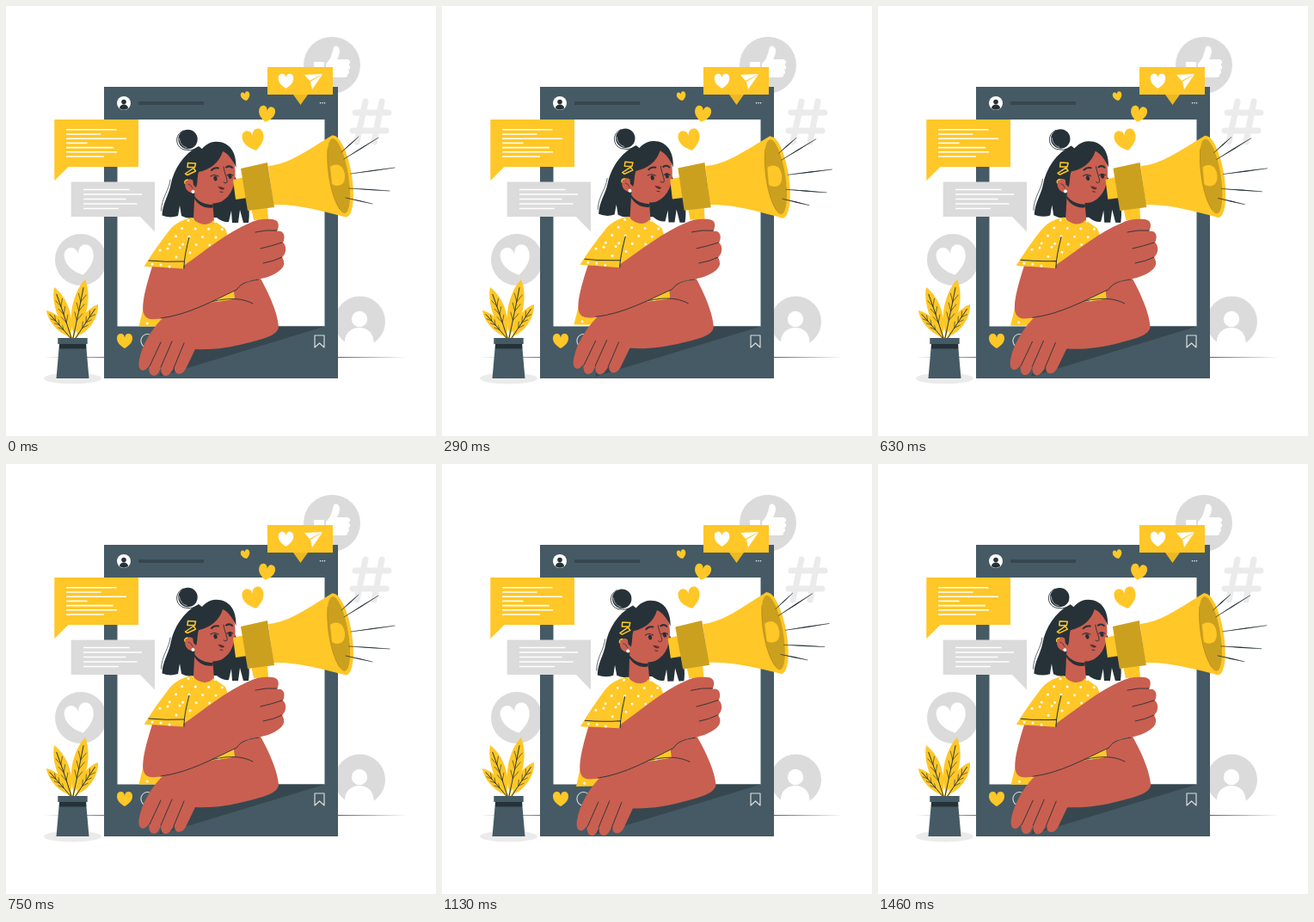
Write an HTML page with a canvas that moves like this. It is 500x500 px and loops after 1500 ms.

```html
<!DOCTYPE html>
<html lang="en">
<head>
<meta charset="utf-8">
<title>Announcement</title>
<style>
html, body { margin: 0; width: 100%; height: 100%; overflow: hidden; background: #fff; }
canvas { display: block; width: 500px; height: 500px; }
</style>
</head>
<body>
<canvas id="stage"></canvas>
<script>
const canvas = document.getElementById('stage');
const ctx = canvas.getContext('2d');
const ratio = window.devicePixelRatio || 1;
canvas.width = canvas.height = 500 * ratio;

const LOOP = 1500, TILT = Math.PI / 180, PIVOT = { x: 303, y: 288 };
const YELLOW = '#ffc727', GOLD = '#cca01f', GREY = '#dbdbdb', PALE = '#ebebeb', SLATE = '#455a64',
      DEEP = '#37474f', INK = '#263238', SKIN = '#c95f50', WHITE = '#fff';

function fill(d, color) {
  ctx.fillStyle = color;
  ctx.fill(new Path2D(d));
}
function line(d, color = INK, width = 1, cap = 'round') {
  ctx.strokeStyle = color;
  ctx.lineWidth = width;
  ctx.lineCap = cap;
  ctx.lineJoin = 'round';
  ctx.stroke(new Path2D(d));
}
function rect(x, y, right, bottom, color) {
  ctx.fillStyle = color;
  ctx.fillRect(x, y, right - x, bottom - y);
}
function oval(x, y, rx, ry, color, angle = 0) {
  ctx.fillStyle = color;
  ctx.beginPath();
  ctx.ellipse(x, y, rx, ry, angle, 0, 7);
  ctx.fill();
}
const disc = (x, y, r, color) => oval(x, y, r, r, color);

function heart(x, y, w, h, degrees, color) {
  ctx.save();
  ctx.translate(x, y);
  ctx.rotate(degrees * Math.PI / 180);
  ctx.scale(w, h);
  fill('M0 .5C-.22 .37-.5 .14-.5-.18C-.5-.41-.38-.5-.25-.5C-.1-.5-.02-.38 0-.22C.02-.38 .1-.5 .25-.5C.38-.5 .5-.41 .5-.18C.5 .14 .22 .37 0 .5Z', color);
  ctx.restore();
}
// Evenly spaced lines of dummy writing, all starting at one margin
function writing(x, y, step, ends) {
  ends.forEach((end, i) => line(`M${x} ${y + i * step}H${end}`, WHITE, 1.6, 'butt'));
}
function ray(x1, y1, x2, y2) {
  const len = Math.hypot(x2 - x1, y2 - y1);
  const nx = (y1 - y2) / len * .6, ny = (x2 - x1) / len * .6;
  const mx = (x1 + x2) / 2, my = (y1 + y2) / 2;
  fill(`M${x1} ${y1}L${mx + nx} ${my + ny}L${x2} ${y2}L${mx - nx} ${my - ny}Z`, INK);
  line(`M${x1} ${y1}L${x2} ${y2}`, INK, .65);
}
// A leaf from its foot to its tip, bulging by `left` and `right` of the midrib
function leaf(x, y, tipX, tipY, left, right) {
  const len = Math.hypot(tipX - x, tipY - y);
  ctx.save();
  ctx.translate(x, y);
  ctx.rotate(Math.atan2(tipY - y, tipX - x));
  line(`M0 0H${len * .2}`, YELLOW, 2);
  fill(`M${len * .06} 0C${len * .3} ${-left} ${len * .75} ${-left} ${len} 0C${len * .75} ${right} ${len * .3} ${right} ${len * .06} 0Z`, YELLOW);
  line(`M0 0Q${len * .5} ${(right - left) / 3} ${len * .86} 0`, INK, .9);
  for (let s = .3; s < .75; s += .16) {
    const mid = (right - left) / 3 * 2 * s * (1 - s);
    line(`M${s * len} ${mid}L${(s + .13) * len} ${mid - left * .4}M${s * len} ${mid}L${(s + .13) * len} ${mid + right * .4}`, INK, .6);
  }
  ctx.restore();
}

function drawBadges() {
  fill('M44 408.5L150 408L360 408L466 408.5L360 409L150 409Z', INK);

  disc(379, 68.7, 33, GREY);
  rect(358, 65, 370, 83, WHITE);
  fill('M372 67C378 62 379 55 381 48C383 45 388 47 388 52C388 56 386 60 385 62H397C401 63 401 67 398 68C401 70 401 73 398 74C400 77 399 79 397 79C398 82 396 83 393 83H379C375 83 374 81 372 81Z', WHITE);

  line('M418 111L408 158M437 111L428 158M406 124H445M403 145H442', PALE, 7);

  disc(87, 295, 30, GREY);
  heart(86, 296, 34, 34, -12, WHITE);

  disc(411.5, 367, 29.5, GREY);
  disc(411, 364, 9.2, WHITE);
  fill('M394 397V390C394 380 402 374 411 374C420 374 427 380 427.5 390V397Z', WHITE);
}

function drawPhone() {
  rect(114, 94, 386, 433, SLATE);
  rect(129.5, 132, 370.5, 372.5, WHITE);
  disc(137, 113, 8, WHITE);
  disc(137, 111.5, 2.8, INK);
  fill('M132 119C132 113 142 113 142 119Q137 122.5 132 119Z', INK);
  rect(154, 111, 230, 115, DEEP);
  for (const x of [365.5, 368, 370.5]) disc(x, 112.7, .75, WHITE);

  heart(138, 389.5, 18, 17, 0, YELLOW);
  line('M165 381.5A7.8 7.8 0 1 0 171 394L173 397L172 391A7.8 7.8 0 0 0 165 381.5', GREY, 1.1);
  line('M359 383H370V397L364.5 392L359 397Z', GREY, 1.2);
  fill('M371 372.5L178 431L190 396L280 372.5Z', DEEP);
}

function drawBubbles() {
  fill('M334 103H351L342.5 115Z', '#edb922');
  rect(304, 71, 380, 103, YELLOW);
  heart(325.5, 87.3, 17.5, 17, 0, WHITE);
  fill('M347 80L368 79L353 87ZM368 79.5L356 97L354 88Z', WHITE);

  fill('M56.3 132H154V187H72.5L56.3 203Z', YELLOW);
  writing(70, 143.8, 5.2, [128.5, 110.5, 140, 94.5, 125, 129, 114]);
  fill('M75.7 204.5H173V262.5L156 245H75.7Z', GREY);
  writing(90, 213.5, 5.5, [143.5, 158, 139.5, 152.5, 131]);

  heart(288, 156, 25, 24.5, -13, YELLOW);
  heart(303, 125.7, 19, 18.5, 10, YELLOW);
  heart(278.5, 105, 10.5, 10.5, -14, YELLOW);
}

function drawPlant() {
  oval(77.5, 433, 33.5, 6.5, PALE);
  leaf(75, 386, 47, 354, 7, 8);
  leaf(76, 386, 56, 327, 9, 11);
  leaf(78, 386, 92, 318, 11, 12);
  leaf(81, 386, 107, 347, 9, 9);
  fill('M62 393H93L96.5 433H58.5Z', SLATE);
  rect(62, 392, 93.2, 398.5, INK);
  rect(60.3, 386, 94.7, 393, SLATE);
}

function drawHairAndNeck() {
  fill('M224 163C206 172 195 190 191.5 208C189 221 182 229 181.5 243.5Q191 247 200 244L202 232L204 244Q211 248 220 246H245Q252 252 259 251L262 238L263 252H270L272 237L276 252H282C284 240 282 230 279 220L264 195Z', INK);
  line('M191 202C190 214 181 222 180.5 238', INK, .7);
  disc(211.5, 155, 11.2, INK);
  line('M206 145C195 150 197 164 207 167Q214 169 222 166', INK, .9);
  line('M201.5 154C202 160 206 164 210 164.5', WHITE, .6);
  fill('M220 205L218 247C222 261 238 262 242 250L240 226Z', SKIN);
}

function drawFace() {
  fill('M222 192C230 176 243 169 252 168C260 170 264 178 266 186C268 201 265 217 254 225C247 231 235 231 228 224L220 217C211 219 206 210 209 204C212 199 218 201 221 207Z', SKIN);
  fill('M218 208C214 179 228 158 244 157.7C260 157.5 268 170 267.5 188C264 180 259 172 252 169C248 182 238 190 224 193C222 200 223 207 221 211Z', INK);
  fill('M219 221C225 229 233 231 240.5 231V234.5C231 236 223 231 219 224Z', INK);
  line('M239 191Q242 187.5 247 188.5M256 187.5Q260 185 263 188', INK, 2);
  oval(243.5, 200.5, 2.1, 2.9, INK, -.2);
  oval(260.5, 198, 2.1, 2.9, INK, -.2);
  line('M238 198Q242 195 247 198M257 197Q260 194 264 197', INK, 1.1);
  line('M253 187C254 195 258 202 257 205Q255 207 253 205', INK, .9);
  fill('M247 211Q250 208.5 252 211Q254 210.5 254 212.5Q251 215.5 247 211Z', '#8e302d');
  line('M247 210Q249 213 253 212.5M249 216L252 216.5', INK, .9);
  line('M212 207Q215 207 217 212', INK, .7);
  disc(217.5, 216, 2, WHITE);
  line('M211.5 182.5L220.5 183L219.5 187.5L211 187.5ZM208.5 195L218 188.5L220.5 192L211 196.5Z', YELLOW, 1.5);
  line('M208 206Q207 203 211 202', YELLOW, 1.5);
}

function drawShirt() {
  const shape = 'M216 246C203 249 195 254 189 262C179 275 169 289 161 302.5L171 304L154.5 372.5H180L266 344L270 300L255 259L241 249C236 256 225 256 216 246Z';
  fill(shape, YELLOW);
  ctx.save();
  ctx.clip(new Path2D(shape));
  for (let row = 0; row < 15; row++)
    for (let col = 0; col < 9; col++)
      disc(150 + col * 15.5 + row % 2 * 7.7 + row * .5, 248 + row * 9.3 + col * .4, 1.5, WHITE);
  ctx.restore();
}

function drawRestingArm() {
  fill('M264 325L296 317C304 331 316 356 317 373C316 383 300 387 282 391.5C260 397.5 240 400 220 399L209 422C204 431 195 429 196 420L191 427C185 434 178 428 181 419L177 427C171 434 164 427 167 418L162 423C156 426 153 420 155 411C158 395 168 378 180 365C194 353 210 349 229 346C248 343 259 343 266 340Z', SKIN);
  line('M180 391L167 419M193 390L180 420M207 392L195 421', INK, .9);
  line('M229 346C247 342 268 336 287 346', INK, .9);
}

function drawMegaphone() {
  fill('M285 234H304L305 248L288 249Z', YELLOW);
  fill('M264 202L277 199L281 223L267 225Z', YELLOW);
  fill('M305 186C329 184 350 168 380 150L396 245.5C369 239 340 230 311 231Z', YELLOW);
  fill('M273 189L304 182L312 234L281 238Z', GOLD);
  oval(388, 198, 14, 48, YELLOW, -.165);
  oval(386.8, 197.5, 11.3, 44, GOLD, -.165);
  fill('M377 187C382 183 388 184 391 188C395 194 395 203 391 207Q385 211 379 207Z', YELLOW);
  line('M374 166C373 190 377 220 388 236', '#a98316', .6);
  ray(390, 170, 410, 152);
  ray(393, 178, 433, 153);
  ray(401, 195, 452, 188);
  ray(399, 212, 446, 215);
  ray(395, 223, 426, 230);
}

function drawRaisedArm() {
  fill('M170 303C164 322 157 346 160 357C163 367 174 364 184 363C212 359 240 343 268 330C274 322 279 320 292 318C305 316 315 311 320 306Q326 300 321 292C327 287 326 278 322 275C326 267 322 260 315 262C318 256 318 249 310 248C300 247 291 248 284 252C257 263 230 286 205 303Z', SKIN);
  line('M180 363C212 359 240 343 268 330C274 322 280 320 294 318', INK, .9);
  line('M290 263Q302 260 315 261M296 282Q309 279 321 275M299 299Q311 297 321 292', INK, .9);
  fill('M161 302.5L177 279L209 282L206 305.5Z', YELLOW);
  for (const [x, y] of [[179, 284], [188, 282], [198, 292], [180, 301], [190, 303], [170, 300], [202, 281]])
    disc(x, y, 1.5, WHITE);
  line('M166 296Q185 298 207 297M207 305C207 293 210 281 213 269', INK, 1);
}

// Sways one degree each way, at constant speed
function swing(t) {
  const p = t % LOOP / LOOP;
  return p < .25 ? p * 4 : p < .75 ? 2 - p * 4 : p * 4 - 4;
}

function draw(t) {
  ctx.setTransform(ratio, 0, 0, ratio, 0, 0);
  rect(0, 0, 500, 500, WHITE);
  drawBadges();
  drawPhone();
  drawBubbles();
  drawPlant();
  ctx.translate(PIVOT.x, PIVOT.y);
  ctx.rotate(swing(t) * TILT);
  ctx.translate(-PIVOT.x, -PIVOT.y);
  drawHairAndNeck();
  drawShirt();
  drawFace();
  drawRestingArm();
  drawMegaphone();
  drawRaisedArm();
}

let start;
function frame(now) {
  start ??= now;
  draw(now - start);
  requestAnimationFrame(frame);
}
draw(0);
requestAnimationFrame(frame);
</script>
</body>
</html>
```
